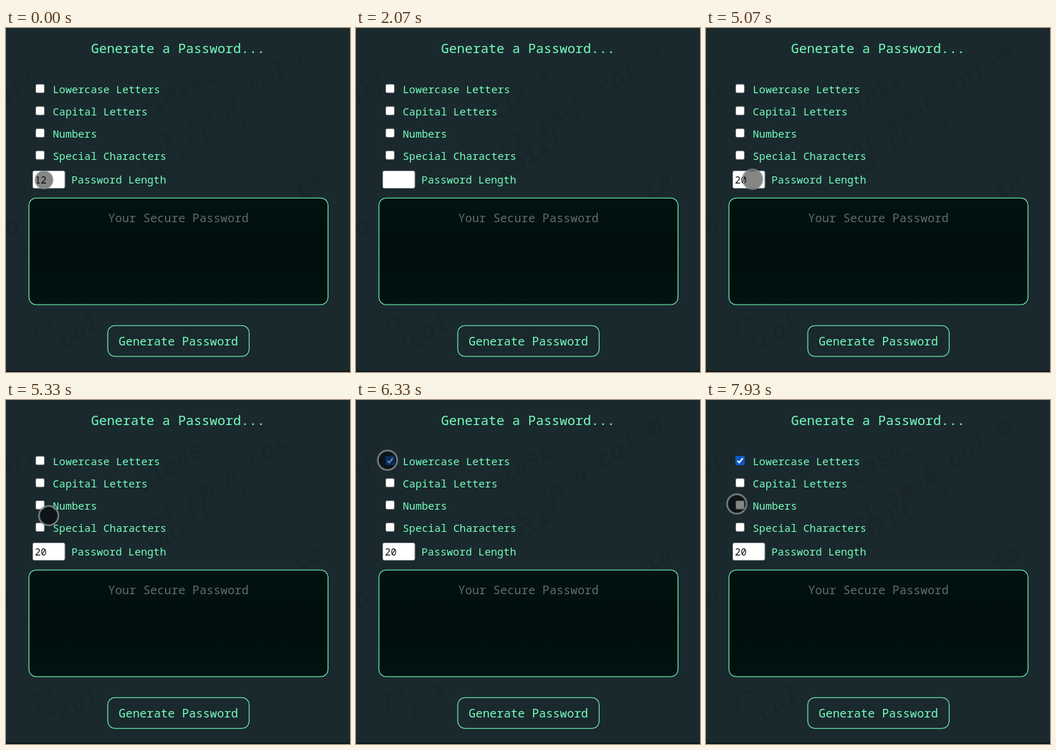
Recreate the animation shown at these times as an HTML page. Size 480 by 480 pixels, loop 8 s.

```html
<!DOCTYPE html>
<html lang="en">
<head>
<meta charset="utf-8">
<title>Password generator</title>
<style>
  html, body { margin: 0; width: 100%; height: 100%; overflow: hidden; background: #1a292e; }
  svg { display: block; width: 480px; height: 480px; }
  text { font: 14.69px "Noto Sans Mono", "DejaVu Sans Mono", monospace; fill: #76ffbd; white-space: pre; }
  .title { font-size: 18.36px; }
  .large { font-size: 16.35px; }
  .mid { text-anchor: middle; }
  .hint { fill: #626c6b; }
  .value { font-size: 13.6px; fill: #111; }
  .code text { font-size: 34px; font-style: italic; font-weight: 600; fill: #000; }
  .panel { stroke: #76ffbd; stroke-width: 1.1; }
  .box { fill: #fff; stroke: #767676; }
</style>
</head>
<body>
<svg viewBox="0 0 480 480">
  <defs>
    <linearGradient id="deep" x2="0" y2="1">
      <stop offset="0" stop-color="#011311"/>
      <stop offset=".5" stop-color="#000e0d"/>
      <stop offset="1" stop-color="#011312"/>
    </linearGradient>
  </defs>
  <rect width="480" height="480" fill="#1a292e"/>
  <g class="code" id="code" opacity=".065"></g>
  <rect y="478.5" width="480" height="1.5" fill="#0a1215"/>

  <text class="title mid" x="240" y="34.5">Generate a Password...</text>
  <g id="options"></g>

  <rect class="box" x="37.5" y="199.5" width="44.5" height="24" rx="2" style="stroke:#a4a9aa"/>
  <text class="value" id="value" x="40.3" y="216.5"></text>
  <rect id="caret" y="202.5" width="1.2" height="19" fill="#111"/>
  <text x="91.3" y="216.5">Password Length</text>

  <rect class="panel" x="32" y="237.3" width="417.3" height="148.7" rx="10" fill="url(#deep)"/>
  <text class="large mid hint" x="240.5" y="270.5">Your Secure Password</text>
  <rect class="panel" x="142" y="415.3" width="197.3" height="43" rx="10" fill="none"/>
  <text class="large mid" x="240.5" y="442.5">Generate Password</text>

  <circle id="pointer" fill="#000" fill-opacity=".48" stroke="#858888" stroke-opacity=".85" stroke-width="2.4"/>
</svg>
<script>
const $ = id => document.getElementById(id);

// Slanted code printed faintly behind the form
$("code").innerHTML = [
  [190, 132, "class_"], [188, 198, "col-sm-6 col-m"], [205, 214, "mail( ',"],
  [38, 438, "?&gt;"], [62, 462, "\"col"], [-8, 112, "n);"], [-14, 304, "fo"], [408, 242, "ta"]
].map(([x, y, s]) => `<text transform="translate(${x} ${y}) rotate(-33)">${s}</text>`).join("");

$("options").innerHTML = ["Lowercase Letters", "Capital Letters", "Numbers", "Special Characters"]
  .map((label, i) => {
    const y = 78 + 31 * i;
    return `<rect class="box" x="41.5" y="${y + .5}" width="12" height="12" rx="2"/>
      <text x="65.3" y="${y + 12.7}">${label}</text>`;
  }).join("") + `<g id="tick"><rect x="41" y="78" width="13" height="13" rx="2.5" fill="#0d57c9"/>
    <path d="M43.8 84.8l2.6 2.6 4.9-6.2" fill="none" stroke="#fff" stroke-width="1.9"/></g>`;

// Pointer keys: step, x, y
const path = [
  [0, 53, 212], [1, 54, 212], [7, 64, 213.5], [10, 64, 213.5], [12, 65, 212],
  [73, 65, 212], [76, 65, 211], [85, 52, 92], [86, 51, 84], [92, 44, 84],
  [105, 44, 84], [107, 44, 135], [117, 43, 145], [120, 43, 145]
];
const ease = u => u * u * (3 - 2 * u);

function pointerAt(n) {
  const i = path.findIndex(k => k[0] > n);
  const [a, ax, ay] = path[i - 1], [b, bx, by] = path[i];
  const u = ease((n - a) / (b - a));
  return [ax + (bx - ax) * u, ay + (by - ay) * u];
}

function draw(now) {
  const n = Math.floor((now % 8000) * 15 / 1000 + .06) % 120; // 15 steps a second
  const value = n < 27 ? "12" : n < 61 ? "" : n < 64 ? "2" : "20";
  const [x, y] = pointerAt(n);
  const show = (id, on) => $(id).setAttribute("visibility", on ? "visible" : "hidden");

  $("value").textContent = value;
  $("caret").setAttribute("x", 40.3 + 8.16 * value.length);
  show("caret", n % 15 >= 7 && n < 94);
  show("tick", n >= 94);

  const pointer = $("pointer");
  pointer.setAttribute("cx", x);
  pointer.setAttribute("cy", y);
  pointer.setAttribute("r", n < 1 ? 11.8 : 13.5);
  show("pointer", n < 22 || n >= 73);
}

const start = performance.now();
(function loop() {
  draw(performance.now() - start);
  requestAnimationFrame(loop);
})();
</script>
</body>
</html>
```
